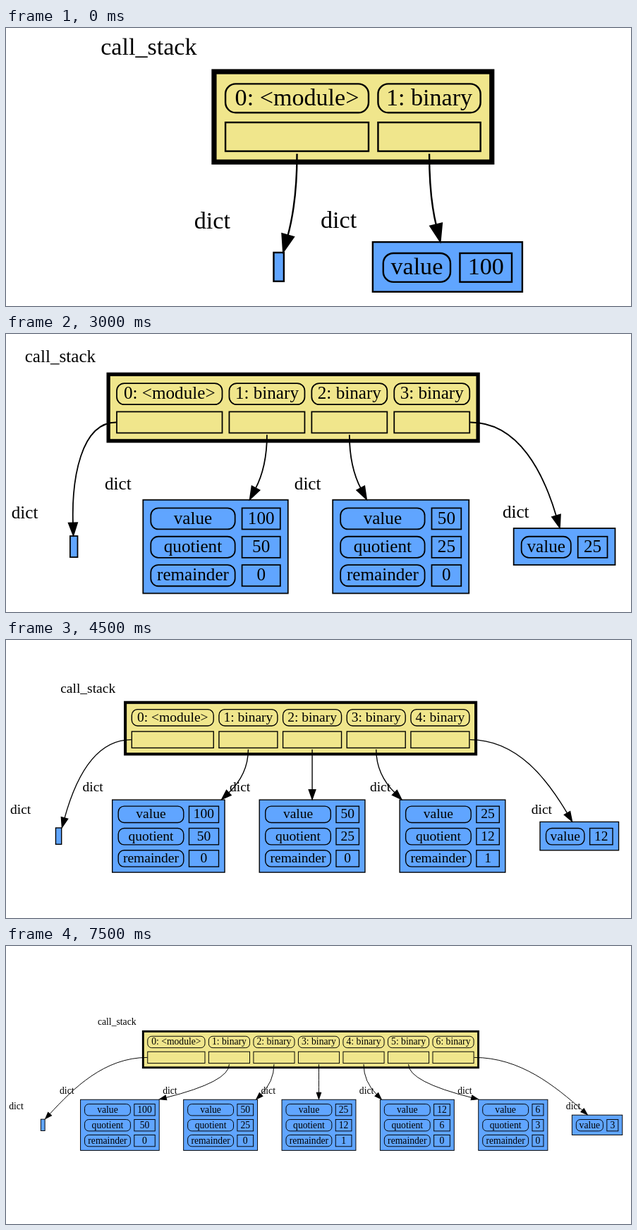
Animation of 886 by 395 pixels, one loop 8000 ms. Source, as an HTML page:

```html
<!DOCTYPE html>
<html lang="en">
<head>
<meta charset="utf-8">
<title>Call stack</title>
<style>
  html, body { margin: 0; width: 100%; height: 100%; overflow: hidden; background: #fff; }
  svg { display: block; font-family: "Liberation Serif", "Times New Roman", serif; animation: play 8s step-end infinite; }
  /* The scenes are stacked in one tall strip that jumps up a stage at a time. */
  @keyframes play {
    0% { transform: translateY(0); }
    18.75% { transform: translateY(-395px); }
    37.5% { transform: translateY(-790px); }
    56.25% { transform: translateY(-1185px); }
    75% { transform: translateY(-1580px); }
    93.75% { transform: translateY(-1975px); }
  }
</style>
</head>
<body>
<svg id="strip" width="886" height="2370"></svg>
<script>
// Each scene is laid out in points and then scaled to fit the stage.
const STAGE_W = 886, STAGE_H = 395, SCENES = 6;
const KHAKI = '#f0e68c', BLUE = '#60a5ff';
const FONT = 14.2, CELL = 18, GAP = 4.6, PITCH = 22.8;
const STACK = { top: 24.3, height: 56.4, padX: 7.7, padY: 8.2 };
const DICT = { top: 126, padX: 6.2, padTop: 6.6, padBottom: 5.8, between: 34.8 };
const MARGIN = { left: 4.4, right: 12.2, bottom: 7.9 };

const clamp = (v, min, max) => Math.max(min, Math.min(max, v));
const escapeText = s => String(s).replace(/</g, '&lt;').replace(/>/g, '&gt;');

function median(list) {
  const half = (list.length - 1) / 2;
  return (list[Math.floor(half)] + list[Math.ceil(half)]) / 2;
}

const box = (x, y, w, h, fill = 'none', pen = 1, r = 0) =>
  `<rect x="${x + pen / 2}" y="${y + pen / 2}" width="${w - pen}" height="${h - pen}" rx="${r}"
    fill="${fill}" stroke="#000" stroke-width="${pen}"/>`;

const text = (x, y, s, anchor = 'start') =>
  `<text x="${x}" y="${y}" font-size="${FONT}" text-anchor="${anchor}">${escapeText(s)}</text>`;

const cell = (x, y, w, s, rounded) =>
  box(x, y, w, CELL, 'none', 1, rounded ? 6 : 0) +
  text(x + w / 2, y + CELL / 2 + 4.1, s, 'middle');

// Columns of the stack table, measured from its left edge.
const column = i => i ? { x: 31.7 + 66 * i, w: 61.4 } : { x: STACK.padX, w: 85.4 };

const stackWidth = count => column(count - 1).x + column(count - 1).w + STACK.padX;

function drawStack(x, count) {
  const y = STACK.top, rowY = y + STACK.padY;
  let out = text(x - 65.4, y - 8.3, 'call_stack') +
    box(x, y, stackWidth(count), STACK.height, KHAKI, 3);
  for (let i = 0; i < count; i++) {
    const { x: dx, w } = column(i);
    out += cell(x + dx, rowY, w, `${i}: ${i ? 'binary' : '<module>'}`, true);
    out += cell(x + dx, rowY + PITCH, w, '');
  }
  return out;
}

// Every call halves the value of the call before it.
function makeDict(i, last) {
  if (!i) return { rows: [], width: 7, height: 18 };
  const value = 100 >> (i - 1), rows = [['value', value]];
  if (!last) rows.push(['quotient', value >> 1], ['remainder', value % 2]);
  const keyWidth = last ? 40.6 : 68.4;
  const valueWidth = 10.6 + 7 * String(value).length;
  return {
    rows, keyWidth, valueWidth,
    width: 2 * DICT.padX + keyWidth + GAP + valueWidth,
    height: DICT.padTop + CELL + PITCH * (rows.length - 1) + DICT.padBottom
  };
}

function drawDict({ rows, x, top, width, height, keyWidth, valueWidth, side }) {
  const [labelX, labelY] = !rows.length ? [46.4, 13.8] : side > 0 ? [8.4, 8] : [30.2, 8];
  let out = text(x - labelX, top - labelY, 'dict') + box(x, top, width, height, BLUE);
  rows.forEach(([key, value], i) => {
    const y = top + DICT.padTop + i * PITCH, keyX = x + DICT.padX;
    out += cell(keyX, y, keyWidth, key, true) + cell(keyX + keyWidth + GAP, y, valueWidth, value);
  });
  return out;
}

// Leaves a cell downwards (side 0) or sideways and bends towards the dict's centre.
function drawArrow(startX, startY, { x, top, width, height, center, side }) {
  const reach = Math.abs(center - startX);
  let tipX, controls;
  if (side) {
    tipX = clamp(center - side * 0.1 * (reach - 38), x, x + width);
    const dx = Math.abs(tipX - startX);
    controls = [[startX + side * (18 + 0.3 * dx), startY],
      [tipX - side * 0.37 * (dx - 38), (startY + top) / 2]];
  } else {
    const t = (top - startY) / (top + height / 2 - startY);
    tipX = clamp(startX + (center - startX) * t * t, x, x + width);
    controls = [[startX, (startY + top) / 2]];
  }
  const [cx, cy] = controls[controls.length - 1];
  const angle = Math.atan2(top - cy, tipX - cx);
  const baseX = tipX - 9 * Math.cos(angle), baseY = top - 9 * Math.sin(angle);
  return `<path d="M${startX} ${startY}${side ? 'C' : 'Q'}${controls.join(' ')} ${baseX} ${baseY}"
      fill="none" stroke="#000"/>
    <path d="M0 0L-10 -3.5V3.5Z" stroke="#000"
      transform="translate(${tipX} ${top}) rotate(${angle * 180 / Math.PI})"/>`;
}

function scene(index) {
  const count = index + 2, last = count - 1;
  const dicts = Array.from({ length: count }, (_, i) => makeDict(i, i === last));
  const tallest = Math.max(...dicts.map(d => d.height));

  let right = 0;
  dicts.forEach((d, i) => {
    d.x = right;
    d.center = d.x + d.width / 2;
    d.top = DICT.top + (tallest - d.height) / 2;
    right += d.width + (i ? DICT.between : 51.4);
  });
  right -= DICT.between;

  // The middle of the stack's cells stands above the middle of the dicts.
  const ports = dicts.map((_, i) => column(i).x + column(i).w / 2);
  const stackX = median(dicts.map(d => d.center)) - median(ports);
  const stackRight = stackX + stackWidth(count);
  dicts.forEach((d, i) => {
    d.side = i === 0 && d.center < stackX ? -1 : i === last && d.center > stackRight ? 1 : 0;
  });

  let out = drawStack(stackX, count) + dicts.map(drawDict).join('');
  dicts.forEach((d, i) => {
    const startX = stackX + ports[i] + d.side * column(i).w / 2;
    const startY = STACK.top + STACK.padY + PITCH + (d.side ? CELL / 2 : CELL + 1);
    out += drawArrow(startX, startY, d);
  });

  const left = Math.min(stackX - 65.4, -46.4) - MARGIN.left;
  const width = right + MARGIN.right - left;
  const height = DICT.top + tallest + MARGIN.bottom;
  const scale = Math.min(STAGE_W / width, STAGE_H / height);
  return `<g transform="translate(${STAGE_W / 2} ${STAGE_H * (index + 0.5)}) scale(${scale})
    translate(${-left - width / 2} ${-height / 2})">${out}</g>`;
}

document.getElementById('strip').innerHTML =
  Array.from({ length: SCENES }, (_, i) => scene(i)).join('');
</script>
</body>
</html>
```
